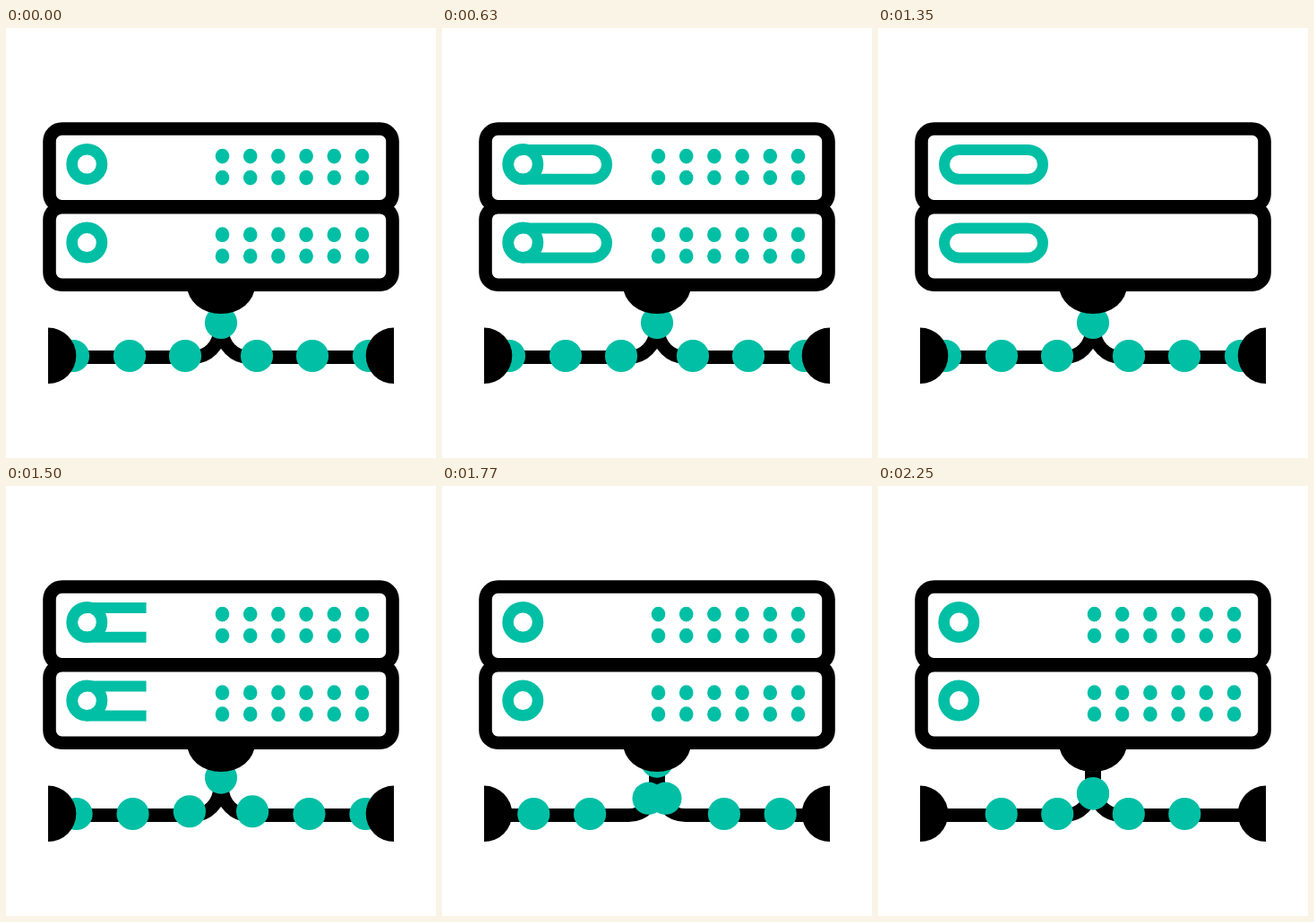
These frames come from a looping animation (480 by 480 pixels, 2.73 s). An HTML page with a canvas:

```html
<!DOCTYPE html>
<html lang="en">
<head>
<meta charset="utf-8">
<title>Server</title>
<style>
html, body { margin: 0; width: 100%; height: 100%; overflow: hidden; background: #fff; }
canvas { display: block; width: 480px; height: 480px; }
</style>
</head>
<body>
<canvas id="stage" width="480" height="480"></canvas>
<script>
const ctx = document.getElementById('stage').getContext('2d');
const LOOP = 2730, TEAL = '#00bfa5', BLACK = '#000';
const SEND = 1365; // the balls set off and the toggles reset

const clamp = v => Math.min(1, Math.max(0, v));
const linear = (t, a, b) => clamp((t - a) / (b - a));
const ease = (t, a, b) => (1 - Math.cos(Math.PI * linear(t, a, b))) / 2;
const mix = (a, b, p) => a + (b - a) * p;

function fillEllipse(x, y, rx, ry, color) {
  ctx.fillStyle = color;
  ctx.beginPath();
  ctx.ellipse(x, y, rx, ry, 0, 0, Math.PI * 2);
  ctx.fill();
}

function strokeRound(x, y, w, h, r, width, color) {
  ctx.strokeStyle = color;
  ctx.lineWidth = width;
  ctx.beginPath();
  ctx.roundRect(x, y, w, h, r);
  ctx.stroke();
}

function clipped(x, y, w, h, draw) {
  if (w <= 0) return;
  ctx.save();
  ctx.beginPath();
  ctx.rect(x, y, w, h);
  ctx.clip();
  draw();
  ctx.restore();
}

function drawWire(side) {
  ctx.save();
  ctx.translate(240, 0);
  ctx.scale(side, 1);
  ctx.strokeStyle = BLACK;
  ctx.lineWidth = 15;
  ctx.beginPath();
  ctx.moveTo(193, 367.5);
  ctx.lineTo(31.5, 367.5);
  ctx.arc(31.5, 337.5, 30, Math.PI / 2, Math.PI);
  ctx.lineTo(1.5, 300);
  ctx.stroke();
  ctx.restore();
}

function drawNetwork(t) {
  const far = ease(t, SEND, 2250), near = ease(t, SEND, SEND + 600);
  const ball = (x, y) => fillEllipse(x, y, 18.1, 18.1, TEAL);
  drawWire(-1);
  drawWire(1);
  ball(240, mix(329, 301, near));
  for (const side of [-1, 1]) {
    ball(240 + side * mix(165, 102.3, far), 366);
    ball(240 + side * mix(102, 39.8, far), 366);
    ball(240 + side * mix(40, 0, near), mix(366, 343.3, near));
  }
  fillEllipse(240, 288, 37.8, 31, BLACK);
  for (const [x, start] of [[47, -Math.PI / 2], [433, Math.PI / 2]]) {
    ctx.fillStyle = BLACK;
    ctx.beginPath();
    ctx.arc(x, 365.8, 31.3, start, start + Math.PI);
    ctx.fill();
  }
}

function drawToggle(t, y) {
  const tip = 100 + 90 * (ease(t, 465, 625) - ease(t, SEND, SEND + 326));
  if (tip > 100) {
    clipped(60, y - 30, tip - 60, 60,
      () => strokeRound(74, y - 16, 110, 32.8, 16.4, 12, TEAL));
  }
  const ring = 1 - ease(t, 630, 840) + ease(t, SEND, SEND + 120);
  if (ring > 0) {
    ctx.strokeStyle = TEAL;
    ctx.lineWidth = 12.5;
    ctx.beginPath();
    ctx.arc(90.3, y, 16.75, -Math.PI / 2, -Math.PI / 2 + Math.PI * 2 * ring);
    ctx.stroke();
  }
}

// Lights go out from left to right, then come back the same way.
function drawLights(t, y, from, to) {
  const row = () => {
    for (let i = 0; i < 6; i++) fillEllipse(241.5 + i * 31.2, y, 7.8, 8.4, TEAL);
  };
  const left = 232, width = 176;
  const off = width * linear(t, from, to), on = width * linear(t, SEND, SEND + 130);
  if (on > 0) clipped(left, y - 12, on, 24, row);
  else clipped(left + off, y - 12, width - off, 24, row);
}

function drawUnit(t, y) {
  strokeRound(48.5, y - 39.5, 383, 86.7, 14, 14.6, BLACK);
  drawToggle(t, y);
  drawLights(t, y - 8.9, 640, 895);
  drawLights(t, y + 15.1, 945, 1345);
}

function frame(now) {
  const t = now % LOOP;
  ctx.fillStyle = '#fff';
  ctx.fillRect(0, 0, 480, 480);
  drawNetwork(t);
  ctx.fillStyle = '#fff';
  ctx.fillRect(50, 114, 380, 172);
  drawUnit(t, 152);
  drawUnit(t, 239.6);
  requestAnimationFrame(frame);
}
requestAnimationFrame(frame);
</script>
</body>
</html>
```
